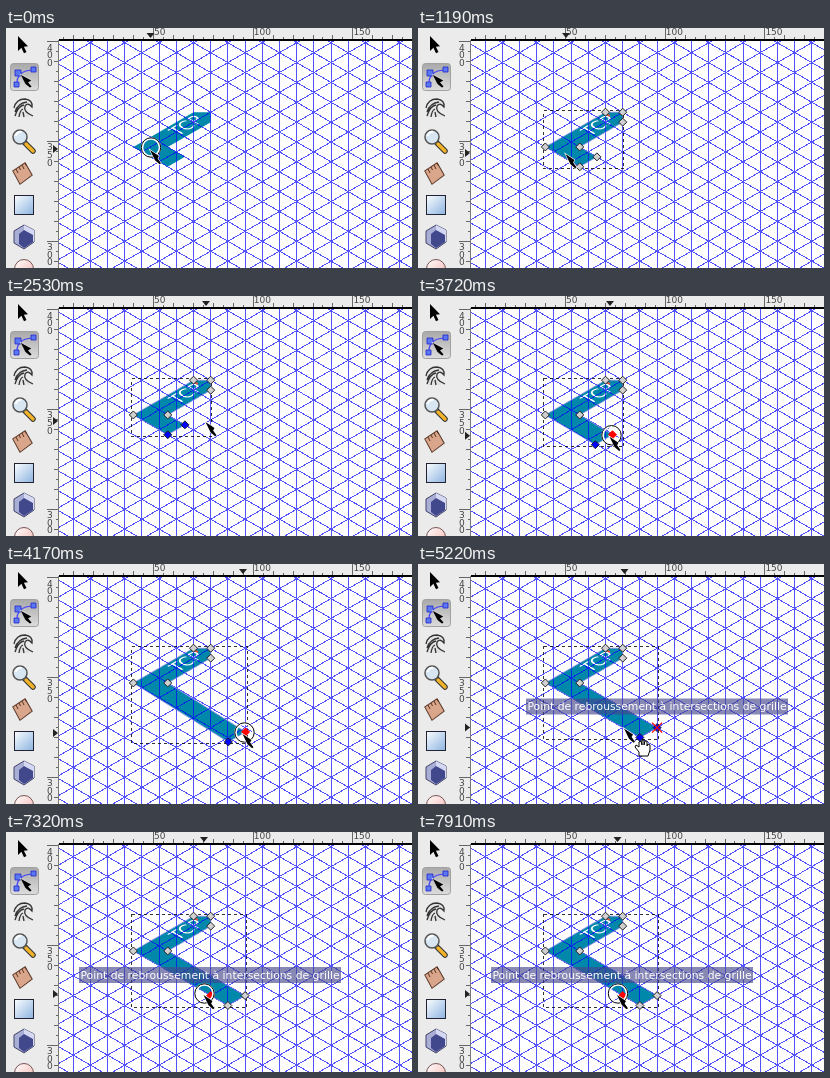
Recreate the animation shown at these times as an HTML page. Size 406 px wide and 240 px high, loop 8 s.

```html
<!DOCTYPE html>
<html lang="fr">
<head>
<meta charset="utf-8">
<title>Grille axonométrique</title>
<style>
html, body { margin: 0; width: 100%; height: 100%; overflow: hidden; background: #fff; }
svg { display: block; width: 406px; height: 240px; }
text { font-family: "DejaVu Sans", sans-serif; }
.crisp { shape-rendering: crispEdges; }
.ruler { font-size: 9px; fill: #444; }
.dash { fill: none; stroke: #000; stroke-opacity: .8; stroke-dasharray: 3 3; }
</style>
</head>
<body>
<svg id="stage" viewBox="0 0 406 240">
  <defs>
    <linearGradient id="sky" x2="1" y2="1"><stop stop-color="#fbfdff"/><stop offset="1" stop-color="#8db4e0"/></linearGradient>
    <linearGradient id="pressed" x2="0" y2="1"><stop stop-color="#a9a9a9"/><stop offset="1" stop-color="#dcdcdc"/></linearGradient>
    <linearGradient id="pink" x2="1" y2="1"><stop stop-color="#fff"/><stop offset="1" stop-color="#f3b4ae"/></linearGradient>
    <clipPath id="view"><path d="M53 12H406V240H53Z"/></clipPath>
  </defs>
  <rect width="406" height="240" fill="#fff"/>
  <g clip-path="url(#view)">
    <path id="shape" fill="#0088aa"/>
    <text transform="matrix(.866 -.5 .866 .5 185.6 100.4)" font-size="17" fill="#fff" text-anchor="middle">TCP</text>
    <path id="grid" class="crisp" fill="none" stroke="#00f" stroke-opacity=".68"/>
    <g id="selection">
      <path id="outline" fill="none" stroke="#8c8ce8" stroke-width=".8"/>
      <rect id="bounds" class="dash crisp"/>
      <path d="M188 86l4 2" stroke="#f43" stroke-width="1.5"/>
      <g id="nodes"></g>
    </g>
    <rect id="band" class="dash crisp"/>
    <g id="snap" stroke="#f00" stroke-width="1.2"><path d="M-5-5 5 5M5-5-5 5"/></g>
    <g id="hint">
      <rect x="-131" y="-8" width="262" height="16" fill="#46468c" fill-opacity=".64"/>
      <text y="3.5" font-size="10.8" fill="#fff" text-anchor="middle">Point de rebroussement à intersections de grille</text>
    </g>
    <g id="ring" fill="none"><circle r="9" stroke="#fff" stroke-width="2.6"/><circle r="9.7" stroke="#000"/></g>
    <path id="hand" d="M221 192v-4l-4-5 1-2 3 2v-5l2-1 1 4v-5h2v5l1-4h2v5l1-2 2 1v5l-2 6Z" fill="#fff" stroke="#000"/>
    <path id="cursor" d="M0 0 9 6 7.6 8.6 11 13.2 9.6 14.2 5 10.2Z" stroke="#fff" stroke-width="1.2" paint-order="stroke"/>
  </g>
  <path d="M0 0H406V12H53V240H0Z" fill="#ebebeb"/>
  <path d="M52.5 12V240" stroke="#777" class="crisp"/>
  <path d="M53 12H406" stroke="#000" stroke-width="2" class="crisp"/>
  <path id="ticks" stroke="#666" class="crisp"/>
  <g id="labels" class="ruler"></g>
  <path id="markX" d="M-4-3H4L0 2Z" fill="#222"/>
  <path id="markY" d="M-3-4V4L2 0Z" fill="#222"/>
  <g id="tools">
    <path d="M12 8V23l3.4-3.2 2.6 5.4 2.5-1.2-2.6-5.3 4.1-.5Z"/>
    <rect x="4.500" y="35.500" width="28" height="27" rx="3" fill="url(#pressed)" stroke="#a0a0a0"/>
    <path d="M11 57Q10 43 26 42" fill="none" stroke="#44f" stroke-width="1.2"/>
    <path d="M9 42h6v6h-6zM25 39h5v5h-5zM8 54h5v5h-5z" fill="#5a78f0" stroke="#22c" stroke-width=".8"/>
    <path d="M14 46 26 52.500 22.500 54.500 26 58.500 24 60 19 56Z" stroke="#fff" stroke-width=".6"/>
    <path d="M8 89Q9 72 19 71Q27 72 26 79Q22 74 19 78Q17 83 27 89Z" fill="#e4e4e4"/>
    <path d="M8 80Q10 71 19 71Q27 72 26 79Q22 74 19 78Q17 84 27 88M9 84Q12 75 21 74M9 88Q12 78 18 77M13 89Q14 82 17 81M18 89l-1-5" fill="none" stroke="#333" stroke-width="1.300"/>
    <path d="M19 115 27 123" stroke="#333" stroke-width="5.500" stroke-linecap="round"/>
    <path d="M20 116 27 123" stroke="#f2b32a" stroke-width="3.500" stroke-linecap="round"/>
    <circle cx="14" cy="109" r="7" fill="#d8e6f2" stroke="#555" stroke-width="1.500"/>
    <path d="M9.500 108q2-5 6-4" fill="none" stroke="#fff" stroke-width="2"/>
    <path d="M7 142 19 134 27 149 14 157Z" fill="#ebebeb"/>
    <path d="M7 142 20 135 26 148 13 156Z" fill="#d9a68c" stroke="#5c3a2a" transform="rotate(-5 17 145)"/>
    <path d="M10 141l2 4M13 139l1.500 3M16 137l2 4M19 135l1.500 3" stroke="#5a321d"/>
    <rect x="8.500" y="167.500" width="19" height="19" fill="url(#sky)" stroke="#223"/>
    <path d="M8 203 18 197 28 202V214L18 221 8 215Z" fill="#a9aed6" stroke="#446"/>
    <path d="M18 197 28 202V214L18 209Z" fill="#d4d8f2"/>
    <path d="M13 206 18 202 27 207V214L18 220 13 216Z" fill="#42488c"/>
    <circle cx="18" cy="241" r="9.500" fill="url(#pink)" stroke="#755"/>
  </g>
</svg>
<script>
const $ = id => document.getElementById(id);
const make = (parent, name, attrs, text = "") => {
  const el = document.createElementNS("http://www.w3.org/2000/svg", name);
  for (const key in attrs) el.setAttribute(key, attrs[key]);
  el.textContent = text;
  return parent.appendChild(el);
};
const place = (id, x, y) => $(id).setAttribute("transform", `translate(${x} ${y})`);
const show = (id, on) => { $(id).style.display = on ? "" : "none"; };
const setBox = (id, x0, y0, x1, y1) => {
  const attrs = { x: x0, y: y0, width: x1 - x0, height: y1 - y0 };
  for (const key in attrs) $(id).setAttribute(key, attrs[key]);
};
const polygon = points => "M" + points.map(p => p.join(" ")).join("L") + "Z";

// Isometric lattice through one known crossing
const PITCH = 19.85, DX = PITCH * Math.cos(Math.PI / 6), SLOPE = Math.tan(Math.PI / 6);
const ORIGIN = [204.7, 84.2];
const at = (col, row) => [ORIGIN[0] + col * DX, ORIGIN[1] + row * PITCH / 2];

function drawGrid() {
  let d = "";
  for (let i = -9; i < 13; i++) d += `M${Math.floor(ORIGIN[0] + i * DX) + .5} 12V240`;
  for (let i = -22; i < 24; i++) {
    const y = ORIGIN[1] + i * PITCH;
    for (const s of [SLOPE, -SLOPE])
      d += `M53 ${y + s * (53 - ORIGIN[0])}L406 ${y + s * (406 - ORIGIN[0])}`;
  }
  $("grid").setAttribute("d", d);
}

function drawRulers() {
  let d = "";
  for (let i = -10; i < 28; i++) {
    const size = i % 10 === 0 ? 11 : i % 2 === 0 ? 4 : 2;
    const x = Math.round(147 + i * 9.97) + .5, y = Math.round(113 + i * 9.97) + .5;
    if (x > 53) d += `M${x} 11v${-size}`;
    if (y > 12) d += `M52 ${y}h${-size}`;
  }
  $("ticks").setAttribute("d", d);
  [50, 100, 150].forEach((n, i) => make($("labels"), "text", { x: 148 + i * 99.7, y: 6.7 }, n));
  [400, 350, 300].forEach((n, i) => [...String(n)].forEach((digit, j) =>
    make($("labels"), "text", { x: 41, y: 22.5 + i * 99.7 + j * 7.7 }, digit)));
}

// start, end, steps, target x, target y
const MOVES = [
  [750, 1190, 4, 148, 125], [1340, 1640, 3, 211, 160], [1790, 1790, 1, 200, 159],
  [1940, 2530, 5, 200, 125], [2670, 2970, 3, 177, 131], [3120, 3120, 1, 177, 130],
  [3720, 4170, 4, 237, 169], [4320, 4320, 1, 248, 169], [4470, 4470, 1, 241, 165],
  [4920, 5220, 3, 206.500, 163.500], [6570, 6870, 3, 198, 162], [7470, 7620, 2, 200, 168],
  [7760, 7910, 2, 199.500, 162]
];

function pointer(t) {
  let x = 144.5, y = 121;
  for (const [start, end, steps, tx, ty] of MOVES) {
    if (t < start) break;
    const gap = steps > 1 ? (end - start) / (steps - 1) : 1;
    const k = Math.min(steps, Math.floor((t - start + 2) / gap) + 1) / steps;
    x += (tx - x) * k;
    y += (ty - y) * k;
  }
  return [x, y];
}

const diamonds = Array.from({ length: 8 }, () =>
  make($("nodes"), "path", { d: "M0-4 4 0 0 4-4 0Z" }));

function render(t) {
  const within = (a, b) => t >= a && t < b;
  const [x, y] = pointer(t);

  let end = at(-1.5, 4.5);
  if (within(3720, 4470)) end = [x + 2.5, y - 1];
  else if (t >= 4470) end = at(2, 8);
  const low = [end[0] - DX, end[1] + PITCH / 2];
  const points = [at(-4.5, 3.5), at(-1, 0), at(0, 0), at(0, 1), at(-2.5, 3.5), end, low];

  const path = polygon(points);
  $("shape").setAttribute("d", path);
  $("outline").setAttribute("d", path);
  show("selection", t >= 300);
  setBox("bounds", 125.5, 82.5, Math.max(205.5, Math.round(end[0]) + 1.5), Math.round(low[1]) + 1.5);

  const chosen = within(1790, 5970), dragging = within(3420, 4470), added = t >= 5970;
  const extra = within(7470, 7760) ? [x + 4, y] : at(0, 8);
  diamonds.forEach((el, i) => {
    const [px, py] = points[i] || extra;
    const active = i === 7 || i === 5 && dragging;
    el.setAttribute("transform", `translate(${px} ${py})`);
    el.style.display = i < 7 || added ? "" : "none";
    el.setAttribute("fill", active ? "#f00" : i > 4 && chosen ? "#00f" : "#d0d0d0");
    el.setAttribute("stroke", active ? "#f00" : "#222");
  });

  show("band", within(1490, 1790));
  setBox("band", 148.5, 125.5, Math.round(x) + .5, Math.round(y) + .5);

  show("hint", within(4320, 5670) || t >= 7320);
  place("hint", t < 4470 ? 252 : t < 6000 ? 239 : 204, t < 6000 ? 142.5 : 143);
  show("snap", within(4470, 5670));
  place("snap", ...at(2, 8));

  show("ring", t < 300 || within(3420, 4920) || within(5820, 5970) || t >= 7320);
  place("ring", x + (within(3720, 4920) ? 1.5 : .5), y - (t < 300 ? 1.5 : .5));
  show("hand", within(5220, 5970));
  place("cursor", x - .5, y + 1);
  place("markX", x, 8);
  place("markY", 50, y);
}

drawGrid();
drawRulers();
const begin = performance.now();
(function tick() {
  render((performance.now() - begin) % 8000);
  requestAnimationFrame(tick);
})();
</script>
</body>
</html>
```
